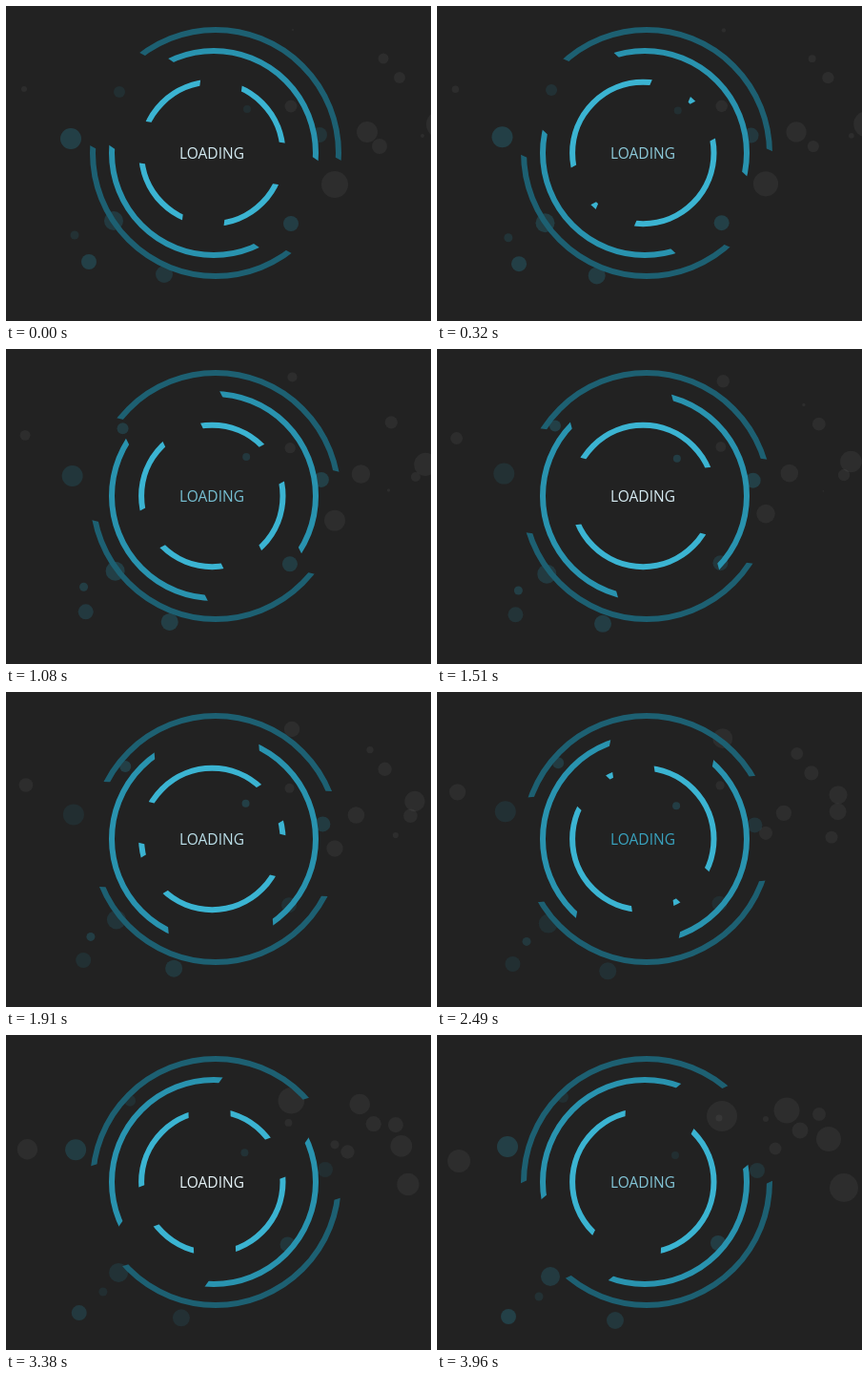
An HTML page with a canvas that plays this animation: 446 px wide and 330 px high, repeating every 4.06 s.

```html
<!DOCTYPE html>
<html lang="en">
<head>
<meta charset="utf-8">
<title>Loading</title>
<style>
  html, body { margin: 0; width: 100%; height: 100%; overflow: hidden; background: #222; }
  canvas, svg { position: absolute; left: 0; top: 0; display: block; }
  text { font: 500 15.5px "Open Sans", "Noto Sans", sans-serif; text-anchor: middle; }
</style>
</head>
<body>
<canvas id="stage" width="446" height="330"></canvas>
<svg width="446" height="330"><text id="label" x="216" y="160">LOADING</text></svg>
<script>
const W = 446, H = 330, TAU = Math.PI * 2;
const LOOP = 4060, MOVE = 3960; // the last pose rests until the loop restarts
const ctx = document.getElementById('stage').getContext('2d');
const label = document.getElementById('label');
const layer = document.createElement('canvas');
layer.width = W;
layer.height = H;
const ink = layer.getContext('2d');

// Turning bars cut each ring on both sides; angles in degrees, speeds per second
const RINGS = [
  { x: 220, r: 129, color: '#1d6072', gap: 110, bars: [{ from: 208.1, speed: -13.45 }] },
  { x: 218, r: 107, color: '#2993af', gap: 110, bars: [{ from: 214.2, speed: 26.83 }] },
  { x: 216.3, r: 74.2, color: '#3bb4d2', gap: 44,
    bars: [{ from: 97.4, speed: 50.4 }, { from: 8.9, speed: -115.2 }] }
];

// Pulsing dots: place, drift over the loop, radius
const BLUE = [
  [68, 139, 6, -22, 11],
  [87, 268, -12, 27, 8],
  [299, 228, -4, -10, 8],
  [113, 225, 6, 28, 10],
  [166, 281, 21, 18, 9],
  [329, 135, 7, 7, 8],
  [72, 240, 35, 34, 4.5],
  [119, 90, 13, -25, 6],
  [253, 108, -3, 18, 4]
];

// Floating dots: place, drift, radius and its growth (below zero it turns over)
const GREY = [
  [413, 75, -32, 25, 6, 2.5],
  [396, 55, -29, 24, 5.5, -19],
  [455, 124, -54, -41, 14, -7],
  [437, 136, -26, -27, 2, 11],
  [392, 147, 35, 13, 8, -23],
  [345, 187, 0, -99, 14, -11],
  [379, 132, -24, -13, 11, -4.5],
  [299, 105, -3, -18, 6.5, -3],
  [301, 25, -2, 60, 1, 15],
  [19, 87, 4, 45, 3, 9]
];

function dot(x, y, r, color) {
  ctx.fillStyle = color;
  ctx.beginPath();
  ctx.arc(x, y, Math.abs(r), 0, TAU);
  ctx.fill();
}

function drawDots(k) {
  for (const [x, y, dx, dy, r, grow] of GREY) {
    dot(x + dx * k, y + dy * k * k, r + grow * k, 'rgba(255,255,255,.05)');
  }
  BLUE.forEach(([x, y, dx, dy, r], i) => {
    const alpha = 0.17 + 0.07 * Math.cos(TAU * k - i * 0.4);
    dot(x + dx * k, y + dy * k, r, `rgba(40,160,190,${alpha})`);
  });
}

function drawRing({ x, r, color, gap, bars }, t) {
  ink.clearRect(0, 0, W, H);
  ink.strokeStyle = color;
  ink.lineWidth = 6;
  ink.beginPath();
  ink.arc(x, 154, r, 0, TAU);
  ink.stroke();
  ink.globalCompositeOperation = 'destination-out';
  for (const { from, speed } of bars) {
    ink.save();
    ink.translate(x, 154);
    ink.rotate((from + speed * t) * TAU / 360);
    ink.fillRect(-150, -gap / 2, 300, gap);
    ink.restore();
  }
  ink.globalCompositeOperation = 'source-over';
  ctx.drawImage(layer, 0, 0);
}

function tintLabel(t) {
  const phase = ((t + 0.15) / 1.8) % 1;
  const glow = Math.abs(1 - 2 * phase);
  const mix = (low, high) => Math.round(low + (high - low) * glow);
  label.setAttribute('fill', `rgb(${mix(44, 245)},${mix(156, 250)},${mix(186, 252)})`);
}

function draw(ms) {
  const time = Math.min(ms % LOOP, MOVE);
  const t = time / 1000;
  ctx.fillStyle = '#222';
  ctx.fillRect(0, 0, W, H);
  drawDots(time / MOVE);
  RINGS.forEach(ring => drawRing(ring, t));
  tintLabel(t);
}

const begin = performance.now();
function tick() {
  draw(performance.now() - begin);
  requestAnimationFrame(tick);
}
tick();
</script>
</body>
</html>
```
